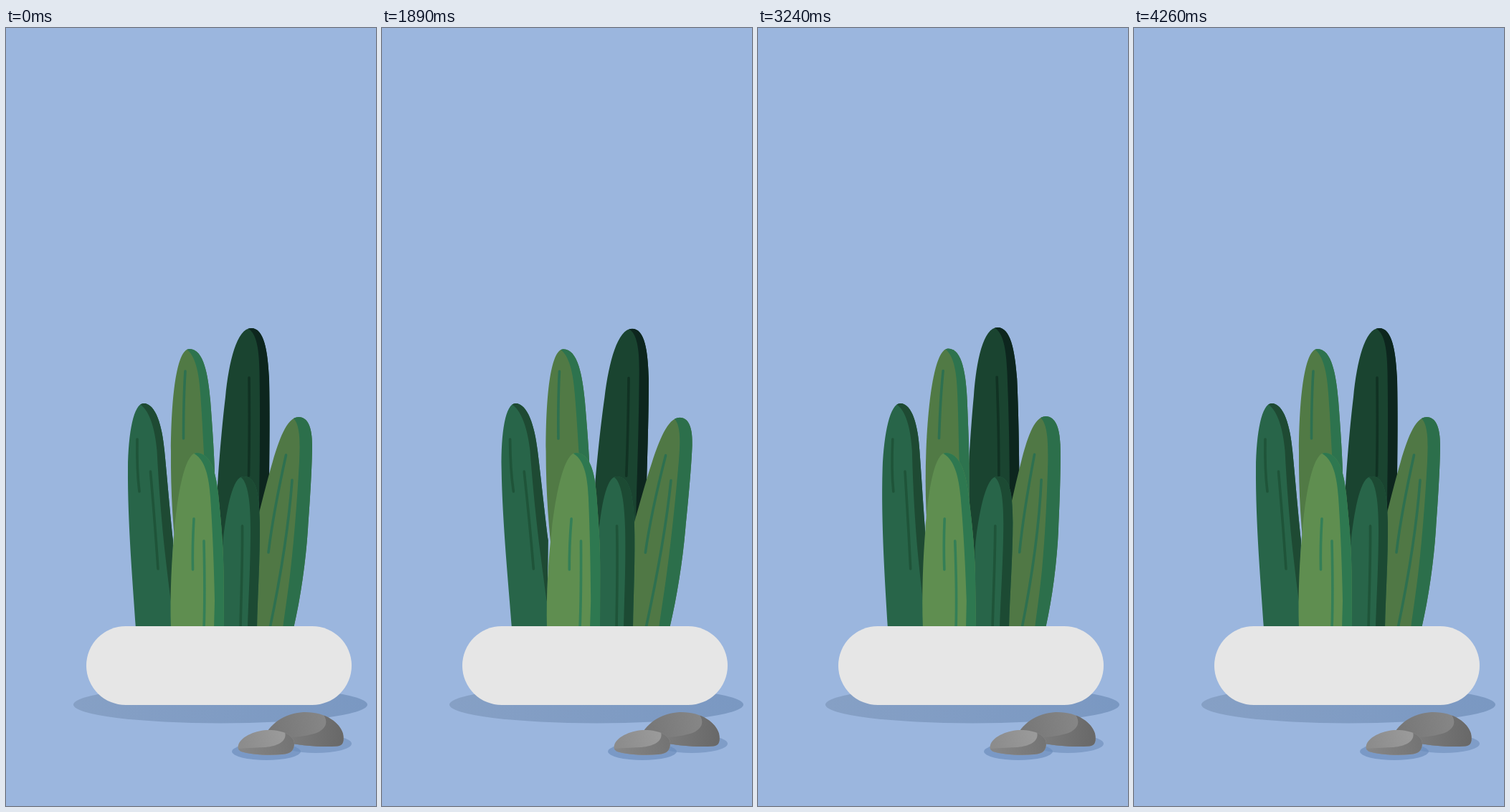
An HTML page with a canvas that plays this animation: 516 px wide and 1086 px high, repeating every 5.37 s.

```html
<!DOCTYPE html>
<html lang="en">
<head>
<meta charset="utf-8">
<title>Swaying plant</title>
<style>
  html, body { margin: 0; width: 100%; height: 100%; overflow: hidden; background: #9bb6de; }
  canvas { display: block; }
</style>
</head>
<body>
<canvas id="stage" width="516" height="1086"></canvas>
<script>
const ctx = document.getElementById('stage').getContext('2d');
const LOOP = 5370, STEP = 30, SWAY_START = 660, SWAY_TIME = 3600;
const GROUND = 835;

// sway: tip offset at the [outward, inward] extreme; dip: tip drop when outward.
// The shade is a seam that is closed along the right-hand side of the leaf.
const leaves = [
  {
    tip: 419, sway: [8, -8], dip: 1,
    fill: '#1a4430', shade: '#0d261e', vein: '#113223',
    body: 'M292,760 L295,640 C298,590 303,540 306,515 C311,465 322,419 342,419 C360,419 365,450 367,490 C368,540 367.5,580 367,630 L362,760 Z',
    seam: 'M337,419 C350,426 353,450 353.5,480 C354.5,540 354,600 353,660 L352,760 L380,760 L380,419 Z',
    veins: 'M339,488 C339.5,535 339.5,580 338.5,625'
  },
  {
    tip: 448, sway: [-3.5, 9.5], dip: 0.4,
    fill: '#517a45', shade: '#2d734e', vein: '#2e7050',
    body: 'M240,760 C233,700 229.5,650 230,590 C230.5,520 237,448 256,448 C276,448 282,485 285,520 C288,560 290,590 291,620 L294,760 Z',
    seam: 'M250,447 C264,456 269,480 271,510 C274,550 275,580 277,610 L278,760 L310,760 L310,447 Z',
    veins: 'M250,479 C248,510 247.5,540 247.5,573'
  },
  {
    tip: 543, sway: [8.4, -7], dip: 1,
    fill: '#507845', shade: '#2c6f4b', vein: '#2e7050',
    body: 'M345,838 L347,700 C356,665 364,632 372,605 C380,578 391,543 408,543 C422,543 427,560 427,582 C427,610 424,660 421,700 C418,745 411,795 401,838 Z',
    seam: 'M399,543 C411,552 410,580 409,605 C406,660 402,710 397,755 C393,790 389,815 386,838 L440,838 L440,543 Z',
    veins: 'M390.5,596 C383,630 371,690 366,732 M399,631 C394,700 380,780 368,838'
  },
  {
    tip: 524, sway: [-7, 6.5], dip: 0,
    fill: '#286549', shade: '#1e4a33', vein: '#1f5439',
    body: 'M181,838 C177,778 169.5,690 170,615 C170.5,565 178,524 192,524 C209,524 218,556 221,590 C225,630 230,690 233,715 L230,838 Z',
    seam: 'M185,524 C200,532 208,560 210.5,590 C213,640 217,690 222,735 C226,770 228,785 230,800 L250,800 L250,524 Z',
    veins: 'M183,574 C182.5,600 183,623 186,647 M201.5,619 C205,660 209,710 212,755'
  },
  {
    tip: 626, sway: [-4.5, 2.5], dip: 0,
    fill: '#286549', shade: '#1c4a33', vein: '#1f5439',
    body: 'M302,838 C302,790 300,740 303,712 C308,670 316,626 331,626 C348,626 353,645 354,690 C354.5,740 351,790 350,838 Z',
    seam: 'M326,626 C338,632 341,665 341,700 C341,750 338,800 337,838 L370,838 L370,626 Z',
    veins: 'M329.5,695 C330,740 328,790 327,838'
  },
  {
    tip: 593, sway: [5.5, -4], dip: 0,
    fill: '#5f8e50', shade: '#2e7850', vein: '#347f57',
    body: 'M230,838 C228.5,790 231,740 235,700 C240,645 250,593 266,593 C285,593 293,620 296,650 C300,690 303,720 303.5,760 L304,838 Z',
    seam: 'M260,593 C277,600 283,625 285,655 C288,700 290,750 291,800 L290,838 L320,838 L320,593 Z',
    veins: 'M262,685 C260.5,710 260,735 260.5,756 M276,716 C277,760 277.5,800 276,838'
  }
];

function bend(path, leaf, sway) {
  const reach = sway > 0 ? leaf.sway[0] : -leaf.sway[1];
  return new Path2D(path.replace(/([\d.]+),([\d.]+)/g, (_, x, y) => {
    const height = Math.max(0, (GROUND - y) / (GROUND - leaf.tip));
    const weight = Math.pow(height, 1.6);
    return `${+x + reach * sway * weight},${+y + leaf.dip * sway * weight}`;
  }));
}

function drawLeaf(leaf, sway) {
  const body = bend(leaf.body, leaf, sway);
  ctx.fillStyle = leaf.fill;
  ctx.fill(body);
  ctx.save();
  ctx.clip(body);
  ctx.fillStyle = leaf.shade;
  ctx.fill(bend(leaf.seam, leaf, sway));
  ctx.restore();
  ctx.strokeStyle = leaf.vein;
  ctx.lineWidth = 3.6;
  ctx.lineCap = 'round';
  ctx.stroke(bend(leaf.veins, leaf, sway));
}

function blend(x0, y0, x1, y1, from, to) {
  const gradient = ctx.createLinearGradient(x0, y0, x1, y1);
  gradient.addColorStop(0, from);
  gradient.addColorStop(1, to);
  return gradient;
}

function ellipse(x, y, rx, ry, fill) {
  ctx.fillStyle = fill;
  ctx.beginPath();
  ctx.ellipse(x, y, rx, ry, 0, 0, Math.PI * 2);
  ctx.fill();
}

function drawStone(outline, shadePath, fill, shade) {
  const body = new Path2D(outline);
  ctx.fillStyle = fill;
  ctx.fill(body);
  ctx.save();
  ctx.clip(body);
  ctx.fillStyle = shade;
  ctx.fill(new Path2D(shadePath));
  ctx.restore();
}

function drawPot() {
  ctx.fillStyle = '#e6e6e6';
  ctx.beginPath();
  ctx.roundRect(112, GROUND, 370, 110, 55);
  ctx.fill();
}

function drawStones() {
  ellipse(432, 999, 50, 13, '#7f9dc8');
  drawStone(
    'M362,986 C374,964 398,955 418,955 C446,955 466,970 470,985 C472,996 470,1002 462,1002.5 C440,1004 415,1002 400,999 Z',
    'M440,955 C452,968 446,980 430,985 C416,989 405,990 390,990 L390,1010 L480,1010 L480,955 Z',
    blend(370, 980, 445, 965, '#777777', '#868686'),
    blend(400, 985, 470, 990, '#7a7a7a', '#686868'));
  ellipse(363, 1010, 48, 12, 'rgba(105, 139, 187, 0.65)');
  drawStone(
    'M324,1001 C328,988 350,980 366,980 C388,980 401,988 402,998 C402,1008 398,1013 385,1014 C365,1016 340,1014 328,1010 C323,1007 323,1004 324,1001 Z',
    'M388,980 C394,994 382,1002 362,1004 C345,1005 334,1005 323,1006 L323,1020 L410,1020 L410,980 Z',
    blend(330, 1000, 385, 985, '#8c8c8c', '#9a9a9a'),
    blend(330, 1008, 400, 1000, '#858585', '#747474'));
}

function swayAt(time) {
  const phase = (time - SWAY_START) / SWAY_TIME;
  return phase > 0 && phase < 1 ? Math.sin(phase * Math.PI * 2) : 0;
}

function render(time) {
  const sway = swayAt(Math.floor(time / STEP) * STEP);
  ctx.fillStyle = '#9bb6de';
  ctx.fillRect(0, 0, 516, 1086);
  ellipse(299, 944.5, 205, 26, blend(94, 0, 504, 0, '#86a0c5', '#7a98c2'));
  leaves.forEach(leaf => drawLeaf(leaf, sway));
  drawPot();
  drawStones();
}

const start = performance.now();
function tick() {
  render((performance.now() - start) % LOOP);
  requestAnimationFrame(tick);
}
tick();
</script>
</body>
</html>
```
